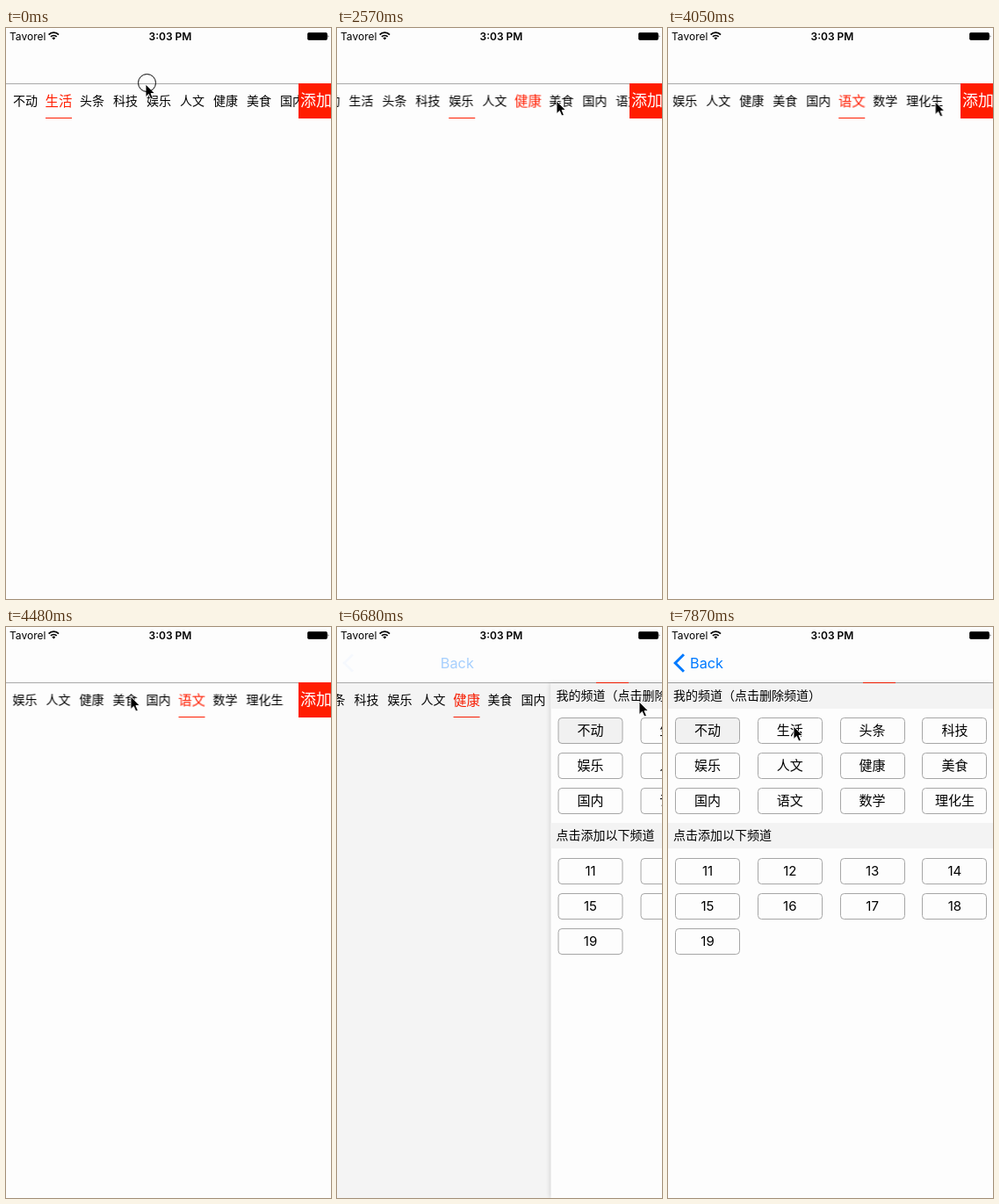
An HTML page for the animation above (8000 ms loop, 370 by 650 pixels).

```html
<!DOCTYPE html>
<html lang="zh-CN">
<head>
<meta charset="utf-8">
<title>频道</title>
<style>
  html, body { margin: 0; width: 100%; height: 100%; overflow: hidden; background: #fdfdfd; }
  body {
    --loop: 8000ms;
    --red: #ff1d00;
    --push: cubic-bezier(.2, .53, .3, 1);
    font: 14px Inter, "Noto Sans CJK SC", "Noto Sans CJK", sans-serif;
    color: #000;
  }
  #stage { position: relative; width: 370px; height: 650px; overflow: hidden; }
  #stage div, #stage svg { position: absolute; }
  .loop { animation: var(--loop) infinite both; }

  /* Status and navigation bars */
  .bar { left: 0; top: 0; width: 370px; height: 63px; border-bottom: 1px solid #a9a9a9; }
  .status { top: 0; font-size: 12px; line-height: 19px; white-space: nowrap; }
  .clock { left: 2px; width: 370px; text-align: center; font-weight: 600; }
  .back { left: 25px; top: 29px; font-size: 16.3px; line-height: 24px; color: #007aff; animation-name: back; }
  .chevron { left: 0; top: 0; animation-name: chevron; }

  /* Channel strip */
  .page { left: 0; top: 64px; width: 370px; height: 586px; animation-name: page; }
  .strip { left: 0; top: 0; width: 333px; height: 39px; overflow: hidden; }
  .scroller { left: 0; top: 0; height: 39px; animation-name: scroll; }
  .tabs { left: 8px; top: 0; display: flex; gap: 10px; line-height: 38px; white-space: nowrap; }
  .tabs span { animation: var(--loop) step-end infinite; }
  .underline { left: 44.6px; top: 38px; width: 30.8px; height: 1px; background: var(--red); animation-name: underline; }
  .add {
    left: 333px; top: -1px; width: 37px; height: 40px; overflow: hidden; background: var(--red);
    color: #fff; font-size: 18px; font-weight: 300; line-height: 40px; text-indent: 2px; white-space: nowrap;
  }
  .dim { inset: 0; background: #000; animation-name: dim; }

  /* Channel editor */
  .panel {
    left: 0; top: 64px; width: 370px; height: 586px; background: #fdfdfd;
    box-shadow: -2px 0 5px rgba(0, 0, 0, .14); animation-name: panel;
  }
  .heading { left: 0; width: 364px; height: 29px; padding-left: 6px; background: #f3f3f3; line-height: 28px; }
  .chip {
    box-sizing: border-box; width: 74px; height: 30px; border: 1px solid #a6a6a6; border-radius: 4.5px;
    font-size: 15px; line-height: 28px; text-align: center;
  }
  .fixed { background: #f1f1f1; }

  .cursor { left: 0; top: 0; overflow: visible; animation-name: cursor; }
  .press { animation: press var(--loop) step-end infinite; }

  @keyframes life { 0% { color: var(--red); transform: scale(1.1); } 11.44%, 100% { color: #000; transform: none; } }
  @keyframes news {
    0%, 30.25%, 100% { color: #000; transform: none; }
    11.44% { color: var(--red); transform: scale(1.1); }
  }
  @keyframes health {
    0%, 41.25% { color: #000; transform: none; }
    30.25%, 62.19%, 100% { color: var(--red); transform: scale(1.1); }
  }
  @keyframes language {
    0%, 62.19%, 100% { color: #000; transform: none; }
    41.25% { color: var(--red); transform: scale(1.1); }
  }
  @keyframes underline {
    0%, 11.44% { transform: none; animation-timing-function: ease-in-out; }
    15.19%, 30.25% { transform: translateX(38px); animation-timing-function: ease-in-out; }
    34%, 41.25% { transform: translateX(190px); animation-timing-function: ease-in-out; }
    45%, 62.19% { transform: translateX(304px); animation-timing-function: ease-in-out; }
    65.94%, 100% { transform: translateX(190px); }
  }
  @keyframes scroll {
    0%, 30.25% { transform: none; animation-timing-function: ease-in-out; }
    34%, 41.25% { transform: translateX(-64.5px); animation-timing-function: cubic-bezier(.45, 0, .62, 1); }
    45%, 50.25% { transform: translateX(-152.5px); animation-timing-function: ease-out; }
    52.25% { transform: translateX(-160px); animation-timing-function: ease-in-out; }
    55.25%, 62.19% { transform: translateX(-152.5px); animation-timing-function: ease-in-out; }
    65.94%, 100% { transform: translateX(-64.5px); }
  }
  @keyframes page {
    0%, 82.08% { transform: none; animation-timing-function: var(--push); }
    88.58%, 100% { transform: translateX(-111px); }
  }
  @keyframes dim {
    0%, 82.08% { opacity: 0; animation-timing-function: var(--push); }
    88.58%, 100% { opacity: .1; }
  }
  @keyframes panel {
    0%, 82.08% { transform: translateX(370px); visibility: hidden; animation-timing-function: var(--push); }
    88.58%, 100% { transform: none; visibility: visible; }
  }
  @keyframes back {
    0%, 82.08% { transform: translateX(141px); opacity: 0; animation-timing-function: var(--push); }
    88.58%, 100% { transform: none; opacity: 1; }
  }
  @keyframes chevron { 0%, 83.3% { opacity: 0; } 88%, 100% { opacity: 1; } }
  @keyframes cursor {
    0%, 2.5% { transform: translate(159px, 64px); animation-timing-function: ease-in-out; }
    10.25%, 12.6% { transform: translate(98px, 87px); animation-timing-function: ease-in-out; }
    17.88% { transform: translate(221px, 86px); }
    21.63%, 26.5% { transform: translate(226px, 88px); animation-timing-function: ease-in-out; }
    28.75%, 36% { transform: translate(250px, 83px); animation-timing-function: ease-in-out; }
    38.13%, 46% { transform: translate(287px, 84px); animation-timing-function: ease-in-out; }
    50% { transform: translate(308px, 84px); animation-timing-function: ease-in-out; }
    56% { transform: translate(142px, 79px); animation-timing-function: ease-out; }
    60.25%, 69.5% { transform: translate(106px, 78px); animation-timing-function: ease-in-out; }
    77.63%, 92.5% { transform: translate(344px, 85px); animation-timing-function: ease-in-out; }
    98.38%, 100% { transform: translate(143px, 113px); }
  }
  @keyframes press {
    0%, 10.25%, 29%, 40%, 60.63%, 80.5% { opacity: 1; }
    .375%, 11.44%, 30.25%, 41.25%, 62%, 81.6%, 100% { opacity: 0; }
  }
</style>
</head>
<body>
<div id="stage">
  <div class="bar">
    <div class="status" style="left:4px">Tavorel</div>
    <div class="status clock">3:03 PM</div>
    <svg width="370" height="20">
      <g fill="none" stroke="#000" stroke-width="1.8">
        <path d="M48.6 7.6a8 8 0 0 1 11.4 0M50.9 9.9a4.9 4.9 0 0 1 6.8 0"/>
      </g>
      <path d="M54.3 13.4l-1.9-2a2.7 2.7 0 0 1 3.8 0z"/>
      <rect x="343.5" y="5.5" width="22" height="8" rx="1.2" stroke="#000" stroke-width=".7"/>
      <path d="M366.6 7.8q1.6 1.7 0 3.4z"/>
    </svg>
    <svg class="chevron loop" width="24" height="60">
      <path d="M18 31.2L8.2 41l9.8 9.8" fill="none" stroke="#007aff" stroke-width="3"/>
    </svg>
    <div class="back loop">Back</div>
  </div>

  <div class="page loop">
    <div class="strip">
      <div class="scroller loop">
        <div class="tabs"></div>
        <div class="underline loop"></div>
      </div>
    </div>
    <div class="add">添加</div>
    <div class="dim loop"></div>
  </div>

  <div class="panel loop">
    <div class="heading" style="top:0">我的频道（点击删除频道）</div>
    <div class="heading" style="top:159px">点击添加以下频道</div>
  </div>

  <svg class="cursor loop" width="12" height="18">
    <path d="M0 0V14.6L3.4 11.4L5.9 17L8.4 15.9L6 10.5H10.4Z" stroke="#fff" stroke-width=".9"/>
    <circle class="press" cx="1.5" cy="-1.5" r="10" fill="none" stroke="#000"/>
  </svg>
</div>
<script>
  const channels = "不动 生活 头条 科技 娱乐 人文 健康 美食 国内 语文 数学 理化生".split(" ");
  const extras = Array.from({ length: 9 }, (_, i) => String(11 + i));
  const highlights = { 生活: "life", 头条: "news", 健康: "health", 语文: "language" };
  const tabs = document.querySelector(".tabs");
  const panel = document.querySelector(".panel");

  function append(parent, tag, text) {
    const node = document.createElement(tag);
    node.textContent = text;
    return parent.appendChild(node);
  }

  function addChips(names, top) {
    names.forEach((name, i) => {
      const chip = append(panel, "div", name);
      chip.className = name === channels[0] ? "chip fixed" : "chip";
      chip.style.left = 8 + (i % 4) * 93.8 + "px";
      chip.style.top = top + Math.floor(i / 4) * 40 + "px";
    });
  }

  for (const name of channels) {
    const tab = append(tabs, "span", name);
    if (highlights[name]) tab.style.animationName = highlights[name];
  }
  addChips(channels, 39);
  addChips(extras, 199);
</script>
</body>
</html>
```
